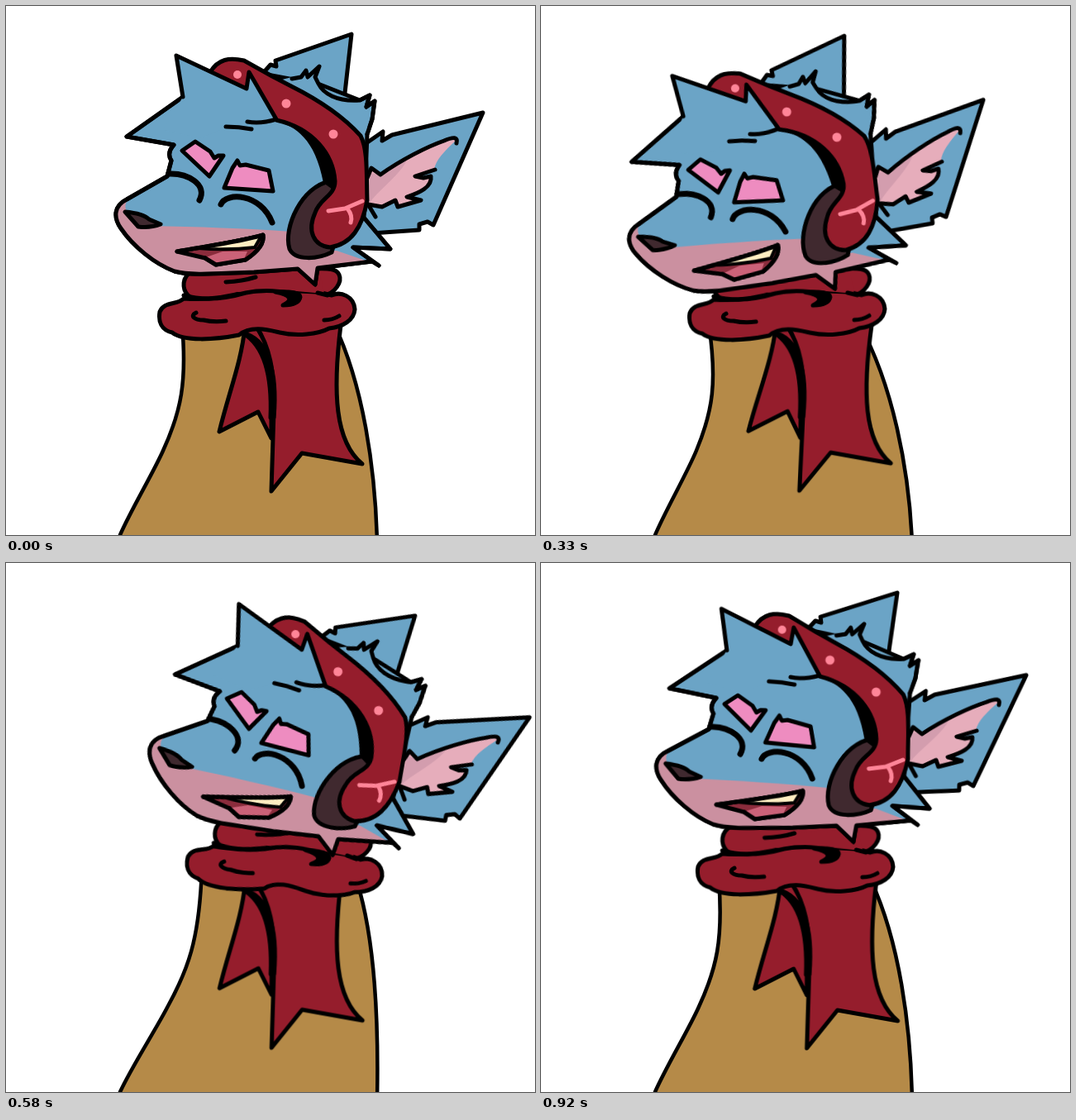
An HTML page that plays this animation: 640 px wide and 640 px high, repeating every 1.01 s.

```html
<!DOCTYPE html>
<html lang="en">
<head>
<meta charset="utf-8">
<title>Swaying character</title>
<style>
html, body { margin: 0; width: 100%; height: 100%; overflow: hidden; background: #fff; }
svg { display: block; width: 100%; height: 100%; }
path { stroke: #000; stroke-width: 5; stroke-linejoin: round; stroke-linecap: round; }
.blue { fill: #6ba4c6; }
.red { fill: #951d2c; }
.tan { fill: #b58a48; stroke-width: 4.5; }
.muzzle { fill: #cb90a0; }
.dark { fill: #40292f; }
.brow { fill: #ee8cc0; }
.line { fill: none; }
.bare { stroke: none; }
.glow { fill: #ff8598; }

#head, #wrap, #tails {
  transform-box: view-box;
  animation: 1010ms step-end infinite;
}
#head { transform-origin: 344px 143.4px; animation-name: head; }
#wrap { transform-origin: 303.5px 370px; animation-name: wrap; }
#tails { transform-origin: 345px 395px; animation-name: tails; }

@keyframes head {
  0%, 41.58% { transform: none; }
  7.92% { transform: translate(-24px, 4.5px) rotate(-3.8deg); }
  16.83%, 24.75%, 32.67% { transform: translate(-39px, 9.4px) rotate(-6.15deg); }
  49.5% { transform: translate(33px, 4px) rotate(6deg); }
  57.43%, 74.26% { transform: translate(57.8px, 14px) rotate(10.75deg); }
  66.34% { transform: translate(59.3px, 14.5px) rotate(11deg); }
  82.18% { transform: translate(31px, 3px) rotate(5.5deg); }
  91.09%, 100% { transform: translate(9.8px, -.4px) rotate(1.73deg); }
}
@keyframes wrap {
  0%, 41.58% { transform: none; }
  7.92% { transform: translate(-4px, 0) rotate(-.3deg); }
  16.83%, 24.75%, 32.67% { transform: translate(-6px, .5px) rotate(-.5deg); }
  49.5% { transform: translate(17px, -1px) rotate(3.3deg); }
  57.43%, 66.34%, 74.26% { transform: translate(33.5px, -1.5px) rotate(6.5deg); }
  82.18% { transform: translate(16px, -1px) rotate(3deg); }
  91.09%, 100% { transform: translate(4px, -1px) rotate(.8deg); }
}
@keyframes tails {
  0% { transform: none; }
  7.92% { transform: translate(-1px, 0); }
  16.83% { transform: translate(-2px, 0) skewX(-.2deg); }
  24.75% { transform: translate(-3.5px, 0) skewX(-.6deg); }
  32.67% { transform: translate(-5px, -.7px) skewX(-1deg); }
  41.58% { transform: translate(-4.5px, -2px) skewX(-1.7deg); }
  49.5% { transform: translate(-2px, -1px) skewX(-1deg); }
  57.43% { transform: translate(.3px, -.6px); }
  66.34% { transform: translate(1.5px, 0) skewX(.9deg); }
  74.26% { transform: translate(3px, .8px) skewX(1.7deg); }
  82.18% { transform: translate(2px, .4px) skewX(1deg); }
  91.09%, 100% { transform: translate(.6px, 0); }
}
</style>
</head>
<body>
<svg viewBox="0 0 640 640">
  <defs>
    <path id="face" d="M214 110L146 158L203 168Q194 178 200 187L195 206L146 234C130 242 130 256 139 269C154 291 180 312 204 321C225 327 262 323 300 322L353 318L374 337L377 317L443 309L451 314L420 292L465 294L433 256L437 155L443 137L446 115L436 122L440 108L428 114L380 95L300 80L240 80Z"/>
    <clipPath id="faceClip"><use href="#face"/></clipPath>
  </defs>

  <path id="body" class="tan"/>

  <g id="tails">
    <path class="red" d="M289 388C285 430 270 466 258 515L305 491L321 523V420L303 388Z"/>
    <path class="red" d="M302 386C319 412 325 440 324 490L321 587L358 541L431 554C398 527 395 468 405 386Z"/>
    <path d="M287 396C316 402 329 440 324 498H320C322 450 314 412 287 396Z"/>
  </g>

  <g id="wrap">
    <path class="red" d="M226 320C212 328 213 342 220 350C250 375 340 370 384 350C398 348 407 334 403 325C399 316 385 318 370 318Z"/>
    <path class="red" d="M215 354C207 362 191 357 186 370C184 382 188 392 201 395C215 406 252 404 282 398C296 386 318 392 331 395C352 400 378 397 391 390C408 388 421 380 422 367C421 351 405 345 394 350L378 346C350 345 320 342 290 346C262 354 240 356 215 354Z"/>
    <path class="red bare" d="M280 330L380 322L385 348L340 344L280 346Z"/>
    <path class="line" d="M215 350C240 357 266 354 290 347C310 343 335 344 354 350M266 334Q286 333 302 328M230 371C222 375 228 380 239 380Q252 383 266 381M385 380Q395 380 403 375M377 347L389 350"/>
    <path d="M326 346C345 345 356 347 356 352C355 359 346 362 335 362C347 356 346 350 326 346Z"/>
  </g>

  <g id="head">
    <!-- right ear -->
    <path class="blue" d="M430 170L456 152L455 163L467 156L577 129L517 265L510 261L500 264V271L442 275L420 240Z"/>
    <path style="fill:#e6adbb" d="M437 210L442 196L453 204C478 185 520 160 545 162C530 176 520 186 518 198L495 206L514 206C514 219 500 226 484 232L502 235L474 243L471 233L458 244L438 240Z" class="bare"/>
    <path class="bare" style="fill:#d39dae" d="M440 202L453 204L486 184C478 204 455 218 440 238Z"/>
    <path class="line" d="M437 208L442 196L453 204C478 186 510 170 530 163Q548 155 545 166M519 198L495 206L505 208L514 206C516 219 500 226 485 231L502 235L474 243L471 235L455 243L438 240L447 255"/>

    <!-- far ear -->
    <path class="blue" d="M312 80L320 71L327 73L326 66L418 34L409 114L360 110Z"/>

    <use href="#face" class="blue" style="stroke:none"/>
    <g clip-path="url(#faceClip)">
      <path class="muzzle bare" d="M120 225L148 234C138 244 150 262 174 266C230 267 290 269 345 273L350 296H400L438 309H460V345H120Z"/>
    </g>
    <path class="blue bare" d="M330 90L346 86L364 78L378 92C392 112 410 112 428 114L440 155Z"/>
    <path class="line" d="M214 110L146 158L203 168Q194 178 200 187L195 206L146 234C130 242 130 256 139 269C154 291 180 312 204 321C225 327 262 323 300 322L353 318L374 337L377 317L443 309L451 314L420 292L465 294L433 256"/>
    <path class="line" d="M437 155L443 137L446 115L436 122L440 108L428 114C400 116 384 106 378 94L374 86L379 73L365 86L363 78L357 86L346 88"/>

    <!-- brows, eyes, nose -->
    <path class="brow" d="M213 175L229 164L247 176L252 184L257 181L263 181L246 206Z"/>
    <path class="brow" d="M264 220L274 196L280 187L283 193L290 192L318 199L323 224Z"/>
    <path class="line" style="stroke-width:7" d="M197 203C220 202 244 216 234 235M260 240C266 225 308 226 322 262"/>
    <path class="dark" d="M144 249Q166 251 173 258L187 264Q174 269 160 267Z"/>

    <!-- mouth -->
    <path style="fill:#8b2c3c" d="M207 297C240 291 285 285 311 277C313 288 302 299 290 307L254 313L241 305Z"/>
    <path class="bare" style="fill:#cb6278" d="M242 304L262 297L292 297L288 306L254 311Z"/>
    <path style="fill:#ffeec2;stroke-width:4" d="M232 293L309 278L301 292Q268 296 232 293Z"/>
    <path class="line" d="M207 297C240 291 285 285 311 277C313 288 302 299 290 307L254 313L241 305"/>

    <!-- headphones -->
    <path class="dark" d="M392 212C358 218 335 268 343 294C350 309 378 306 394 298L412 235Z"/>
    <path class="bare" d="M327 139C350 146 374 160 384 214L398 224L396 180L350 138Z"/>
    <path class="red" d="M247 80C257 64 270 62 288 66L322 85L345 97C385 117 412 138 429 157C438 174 436 205 437 235C431 268 418 288 392 292C372 290 364 272 374 250C380 232 398 230 398 212C396 180 372 148 327 138L290 110Z"/>
    <g class="glow">
      <circle cx="280" cy="83" r="5"/>
      <circle cx="339" cy="118" r="5.5"/>
      <circle cx="396" cy="155" r="5.5"/>
    </g>
    <path class="line" style="stroke:#ff8598" d="M390 248L410 245L431 236M413 245Q420 254 417 262"/>

    <!-- forelock -->
    <path class="blue bare" d="M206 60L291 100L294 80L327 137Q305 142 292 137L235 160L190 150L214 110Z"/>
    <path class="line" d="M214 110L206 60L291 100L294 80L327 137Q308 143 292 140M266 146Q282 146 297 149"/>
  </g>
</svg>
<script>
// The body bends from a fixed base; the far side leans a little more.
const LOOP = 1010;
const times = [0, 80, 170, 420, 500, 580, 670, 750, 830, 920, LOOP];
const leans = [0, -5, -9, 0, 10, 21, 25, 28, 16, 2, 2];

function bodyPath(lean) {
  const bend = (x, y, amount) =>
    `${x + amount * Math.max(0, (640 - y) / 240) ** 1.7} ${y}`;
  const l = (x, y) => bend(x, y, lean);
  const r = (x, y) => bend(x, y, lean * 1.18);
  return `M134 650 L138 640 C${l(150, 612)} ${l(178, 565)} ${l(190, 538)}` +
    ` C${l(212, 490)} ${l(219, 455)} ${l(213, 385)} L${r(397, 385)}` +
    ` C${r(432, 458)} ${r(447, 560)} 449 650 Z`;
}

const body = document.getElementById("body");
body.setAttribute("d", bodyPath(0));
body.animate(
  leans.map((lean, i) => ({
    d: `path("${bodyPath(lean)}")`,
    offset: times[i] / LOOP,
    easing: "step-end"
  })),
  { duration: LOOP, iterations: Infinity }
);
</script>
</body>
</html>
```
